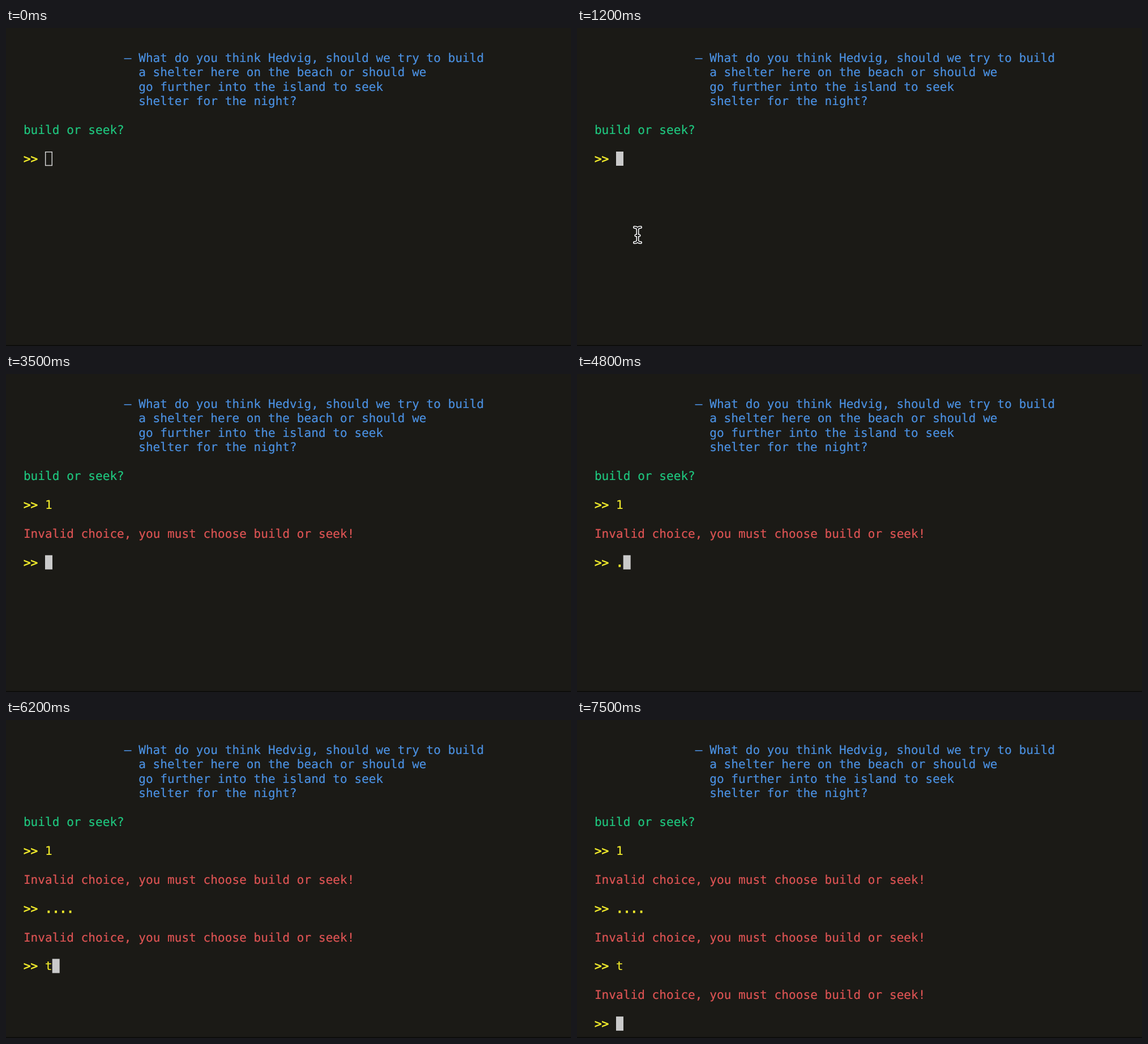
These frames come from a looping animation (998 by 561 pixels, 8.75 s). An HTML page:

```html
<!DOCTYPE html>
<html lang="en">
<head>
<meta charset="utf-8">
<title>Text adventure prompt</title>
<style>
html, body { margin: 0; width: 100%; height: 100%; overflow: hidden; background: #1b1a16; }
svg { display: block; width: 998px; height: 561px; }
text {
  font: 21.11px "DejaVu Sans Mono", "Noto Sans Mono", monospace;
  text-rendering: geometricPrecision;
  stroke-width: .2px;
}
.ask { fill: #4b91e2; stroke: #4b91e2; }
.options { fill: #1fc77f; stroke: #1fc77f; }
.input { fill: #f1eb2c; stroke: #f1eb2c; }
.error { fill: #de5454; stroke: #de5454; }
.prompt { stroke-width: .6px; }
.dot { stroke-width: 1.2px; }

.anim { animation: 8750ms step-end infinite; }
.one { animation-name: one; }
.reply1 { animation-name: reply1; }
.dot1 { animation-name: dot1; }
.dot2 { animation-name: dot2; }
.dot3 { animation-name: dot3; }
.dot4 { animation-name: dot4; }
.reply2 { animation-name: reply2; }
.tee { animation-name: tee; }
.reply3 { animation-name: reply3; }
.hollow { animation-name: hollow; }
.block { animation-name: block; }
.arrow { animation-name: arrow; }
.beam { animation-name: beam; }

/* typing and replies */
@keyframes one { 0% { opacity: 0 } 29.714%, 100% { opacity: 1 } }
@keyframes reply1 { 0% { opacity: 0 } 34.285%, 100% { opacity: 1 } }
@keyframes dot1 { 0% { opacity: 0 } 54.857%, 100% { opacity: 1 } }
@keyframes dot2 { 0% { opacity: 0 } 56%, 100% { opacity: 1 } }
@keyframes dot3 { 0% { opacity: 0 } 57.142%, 100% { opacity: 1 } }
@keyframes dot4 { 0% { opacity: 0 } 58.285%, 100% { opacity: 1 } }
@keyframes reply2 { 0% { opacity: 0 } 60.571%, 100% { opacity: 1 } }
@keyframes tee { 0% { opacity: 0 } 70.857%, 100% { opacity: 1 } }
@keyframes reply3 { 0% { opacity: 0 } 74.285%, 100% { opacity: 1 } }

/* text cursor: outlined until the window has focus */
@keyframes hollow { 0% { opacity: 1 } 9.142%, 100% { opacity: 0 } }
@keyframes block {
  0% { opacity: 0; transform: translate(69px, 218px) }
  9.142% { opacity: 1; transform: translate(69px, 218px) }
  29.714% { opacity: 1; transform: translate(81.7px, 218px) }
  34.285% { opacity: 1; transform: translate(69px, 319.7px) }
  54.857% { opacity: 1; transform: translate(81.7px, 319.7px) }
  56% { opacity: 1; transform: translate(94.4px, 319.7px) }
  57.142% { opacity: 1; transform: translate(107.2px, 319.7px) }
  58.285% { opacity: 1; transform: translate(119.9px, 319.7px) }
  60.571% { opacity: 1; transform: translate(69px, 421.4px) }
  70.857% { opacity: 1; transform: translate(81.7px, 421.4px) }
  74.285%, 100% { opacity: 1; transform: translate(69px, 523.1px) }
}

/* mouse pointer */
@keyframes arrow {
  0% { opacity: 0; transform: translate(62px, 222px) }
  1.142% { opacity: 1; transform: translate(62px, 222px) }
  2.285% { opacity: 1; transform: translate(64px, 228px) }
  3.428% { opacity: 1; transform: translate(66px, 233px) }
  4.571% { opacity: 1; transform: translate(67px, 237px) }
  5.714% { opacity: 1; transform: translate(74px, 262px) }
  6.857% { opacity: 1; transform: translate(85px, 297px) }
  8% { opacity: 1; transform: translate(97px, 332px) }
  9.142%, 100% { opacity: 0; transform: translate(97px, 332px) }
}
@keyframes beam {
  0% { opacity: 0; transform: translate(104px, 356px) }
  9.142% { opacity: 1; transform: translate(104px, 356px) }
  10.285% { opacity: 1; transform: translate(107px, 365px) }
  29.714%, 100% { opacity: 0; transform: translate(107px, 365px) }
}
</style>
</head>
<body>
<svg viewBox="0 0 998 561">
  <defs>
    <path id="ibeam" fill="none" stroke-linecap="round" stroke-linejoin="round"
      d="M-5.5-13.5Q0-13.5 0-9.5Q0-13.5 5.5-13.5M0-9.5V9.5M-5.5 13.5Q0 13.5 0 9.5Q0 13.5 5.5 13.5M-3 1H3"/>
  </defs>
  <rect width="998" height="561" fill="#1b1a16"/>
  <rect y="559.5" width="998" height="1.5" fill="#0a0a08"/>

  <g class="ask">
    <text x="208.8" y="60">–</text>
    <text x="234.2" y="60">What do you think Hedvig, should we try to build</text>
    <text x="234.2" y="85.4">a shelter here on the beach or should we</text>
    <text x="234.2" y="110.9">go further into the island to seek</text>
    <text x="234.2" y="136.3">shelter for the night?</text>
  </g>
  <text class="options" x="30.9" y="187.1">build or seek?</text>

  <rect class="anim hollow" x="69.7" y="218.7" width="11.6" height="23.8" fill="none" stroke="#d2d2d2" stroke-width="1.5"/>
  <rect class="anim block" width="12.7" height="25.3" fill="#cacaca" shape-rendering="crispEdges"/>

  <g class="input">
    <text class="prompt" x="30.9" y="238">&gt;&gt;</text>
    <text class="anim one" x="69" y="238">1</text>
  </g>

  <g class="anim reply1">
    <text class="error" x="30.9" y="288.9">Invalid choice, you must choose build or seek!</text>
    <text class="input prompt" x="30.9" y="339.7">&gt;&gt;</text>
  </g>
  <g class="input">
    <text class="dot anim dot1" x="69" y="339.7">.</text>
    <text class="dot anim dot2" x="81.7" y="339.7">.</text>
    <text class="dot anim dot3" x="94.4" y="339.7">.</text>
    <text class="dot anim dot4" x="107.2" y="339.7">.</text>
  </g>

  <g class="anim reply2">
    <text class="error" x="30.9" y="390.6">Invalid choice, you must choose build or seek!</text>
    <text class="input prompt" x="30.9" y="441.4">&gt;&gt;</text>
  </g>
  <text class="input anim tee" x="69" y="441.4">t</text>

  <g class="anim reply3">
    <text class="error" x="30.9" y="492.3">Invalid choice, you must choose build or seek!</text>
    <text class="input prompt" x="30.9" y="543.2">&gt;&gt;</text>
  </g>

  <path class="anim arrow" d="M0 0V25L5.5 20L9.5 29L14 27L10.3 18.5H18Z" fill="#0c0c0c" stroke="#fff" stroke-width="2"/>
  <g class="anim beam">
    <use href="#ibeam" stroke="#fff" stroke-width="5"/>
    <use href="#ibeam" stroke="#0c0c0c" stroke-width="1.8"/>
  </g>
</svg>
</body>
</html>
```
